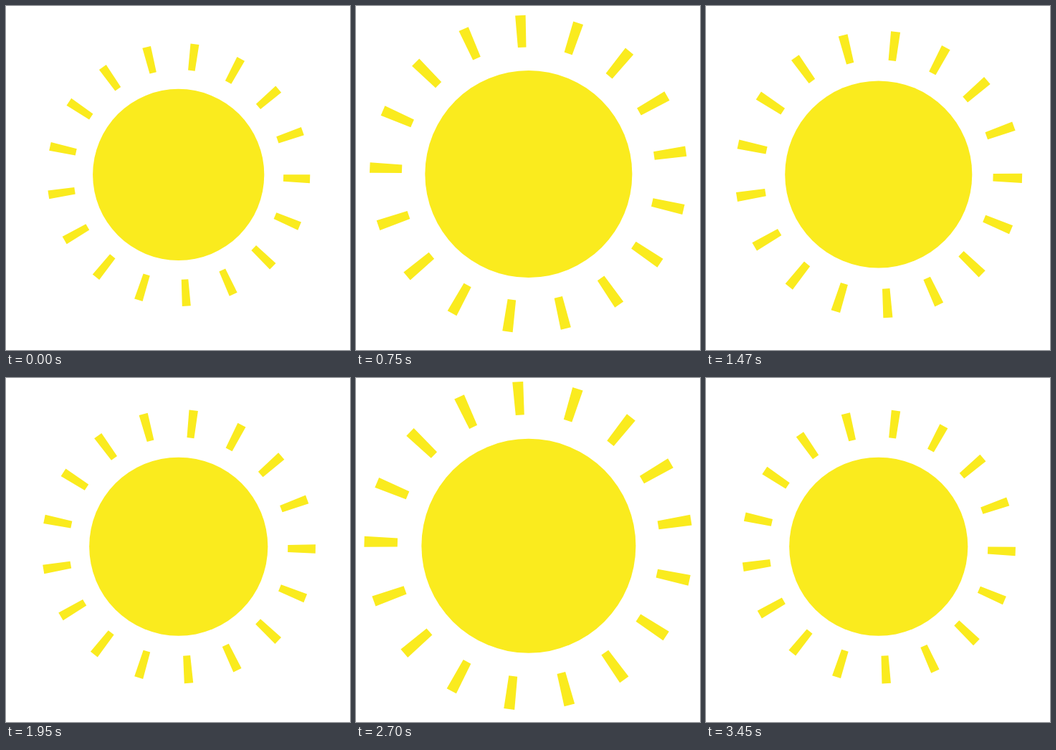
An HTML page with a canvas that plays this animation: 480x480 px, repeating every 3.48 s.

```html
<!DOCTYPE html>
<html lang="en">
<head>
<meta charset="utf-8">
<title>Sun</title>
<style>
  html, body { margin: 0; width: 100%; height: 100%; overflow: hidden; background: #fff; }
  canvas { display: block; }
</style>
</head>
<body>
<canvas id="stage" width="480" height="480"></canvas>
<script>
const ctx = document.getElementById('stage').getContext('2d');
const LOOP = 3480, STEP = 30;
const PULSE = 900;          // ms from smallest to largest
const SPIN = 1.2905 / STEP; // degrees per ms
const RAYS = 17, FIRST_RAY = 1.83;
const DISC = 119.6;
const INNER = { r: 146.4, half: 4.8 };
const OUTER = { r: 183.5, half: 6 };
const rad = deg => deg * Math.PI / 180;

function pulse(t) {
  const phase = (t / PULSE) % 2;
  return 1 + 0.25 * (phase < 1 ? phase : 2 - phase);
}

function drawRay() {
  ctx.beginPath();
  ctx.moveTo(INNER.r, -INNER.half);
  ctx.lineTo(OUTER.r, -OUTER.half);
  ctx.lineTo(OUTER.r, OUTER.half);
  ctx.lineTo(INNER.r, INNER.half);
  ctx.fill();
}

function draw(t) {
  ctx.fillStyle = '#fff';
  ctx.fillRect(0, 0, 480, 480);
  ctx.fillStyle = '#faeb1e';
  ctx.save();
  ctx.translate(240, 240);
  const scale = pulse(t);
  ctx.scale(scale, scale);
  ctx.translate(0.7, -4.6);
  ctx.beginPath();
  ctx.arc(0, 0, DISC, 0, 2 * Math.PI);
  ctx.fill();
  ctx.rotate(rad(FIRST_RAY + SPIN * t));
  for (let i = 0; i < RAYS; i++) {
    drawRay();
    ctx.rotate(2 * Math.PI / RAYS);
  }
  ctx.restore();
}

const start = performance.now();
function tick() {
  const t = (performance.now() - start) % LOOP;
  draw(Math.floor(t / STEP) * STEP);
  requestAnimationFrame(tick);
}
tick();
</script>
</body>
</html>
```
